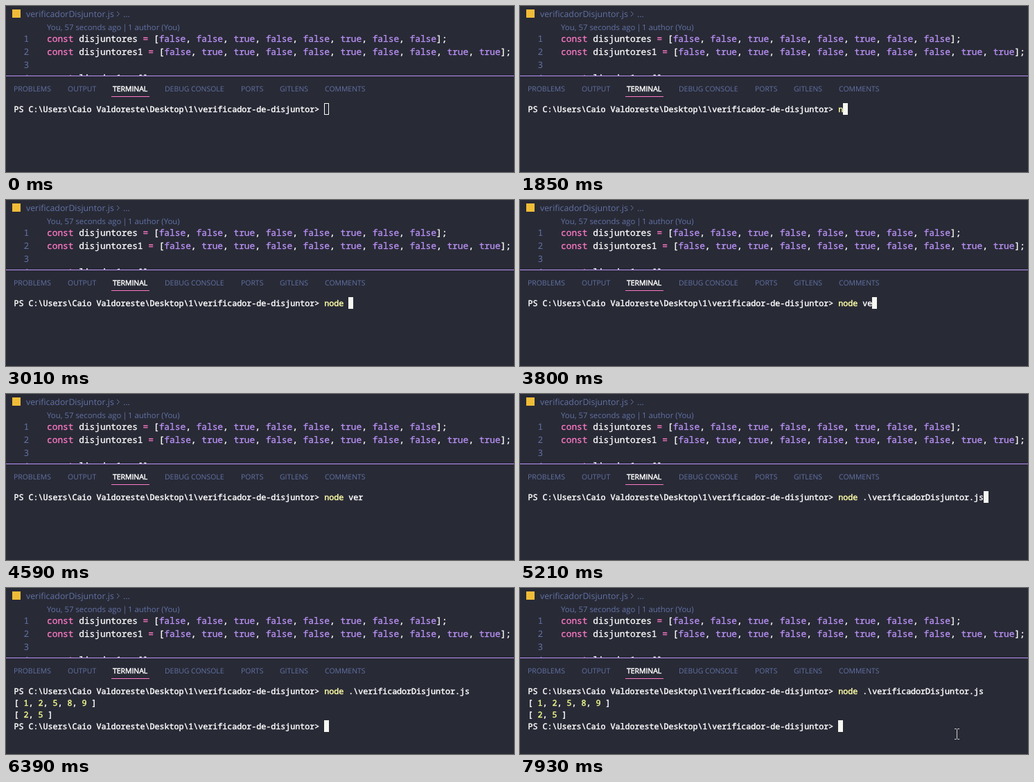
An HTML page that plays this animation: 733x241 px, repeating every 8 s.

```html
<!DOCTYPE html>
<html lang="pt">
<head>
<meta charset="utf-8">
<style>
  html, body { margin: 0; width: 100%; height: 100%; overflow: hidden; background: #282a36; }
  svg { display: block; }
  text { white-space: pre; text-rendering: geometricPrecision; }
  text, tspan { fill: currentColor; stroke: currentColor; stroke-width: 0; }
  .ui { font-family: "Open Sans", "Noto Sans", sans-serif; }
  .code, .term { font-family: "Noto Sans Mono", "DejaVu Sans Mono", monospace; color: #fff; }
  .code { font-size: 12.83px; }
  .term { font-size: 11.667px; font-weight: 500; }
  .code :is(text, tspan) { stroke-width: 0.3px; }
  .term :is(text, tspan), .tabs .active { stroke-width: 0.45px; }
  .crumb { font-size: 12.35px; }
  .lens { font-size: 11.4px; }
  .tabs { font-size: 10.45px; }
  .dim { color: #6272a4; }
  .code .dim { stroke-width: 0; }
  .active { color: #fff; }
  .key { color: #ff79c6; }
  .bool { color: #bd93f9; }
  .cmd { color: #ffffa5; }
  .num { color: #f1fa8c; }
</style>
</head>
<body>
<svg width="733" height="241" viewBox="0 0 733 241">
  <rect width="733" height="241" fill="#282a36"/>
  <rect x="9" y="5" width="12" height="12" fill="#f0bc38"/>
  <g class="ui crumb dim">
    <text x="29" y="16">verificadorDisjuntor.js</text>
    <path d="M160 8l3.5 3.5-3.5 3.5" fill="none" stroke="#6272a4"/>
    <text x="169" y="16">...</text>
  </g>
  <g class="ui lens dim">
    <text x="59" y="35">You, 57 seconds ago</text>
    <text x="168.5" y="35">|</text>
    <text x="176" y="35">1 author (You)</text>
  </g>
  <g id="code" class="code"></g>
  <rect y="101" width="733" height="140" fill="#282a36"/>
  <rect y="101" width="733" height="1" fill="#bd93f9"/>
  <g id="tabs" class="ui tabs dim"></g>
  <rect x="152" y="131" width="55" height="1" fill="#ff79c6"/>
  <g id="term" class="term"></g>
  <rect id="caret" stroke="#f8f8f2"/>
  <path id="mouse" d="M-3.5-7.5h2.5l1 1 1-1h2.5M0-6.5v13M-3.5 7.5h2.5l1-1 1 1h2.5" fill="none" stroke="#d0d0d0"/>
</svg>
<script>
const $ = id => document.getElementById(id);
const text = (x, y, content, cls = '') => `<text x="${x}" y="${y}" class="${cls}">${content}</text>`;
const span = (cls, content) => `<tspan class="${cls}">${content}</tspan>`;

const LOOP = 8000, LEFT = 11, TOP = 141, CELL = 7, ROW = 17;
const PROMPT = 'PS C:\\Users\\Caio Valdoreste\\Desktop\\1\\verificador-de-disjuntor> ';
const OUTPUT = ['[ 1, 2, 5, 8, 9 ]', '[ 2, 5 ]'];
const KEYS = [
  [0, ''], [1850, 'n'], [2340, 'no'], [2530, 'nod'], [2720, 'node'], [3010, 'node '],
  [3700, 'node v'], [3800, 'node ve'], [4070, 'node ver'], [4670, 'node veri'],
  [5130, 'node .\\verificadorDisjuntor.js']
];
const FOCUS = 930, ENTER = 6130, PRINT = 6320, DONE = 6390;
const BLINKS = [[3610, 3700], [4590, 4670]];
const MOVES = [7730, 7800, 7860, 7930];

const CODE = [
  'const disjuntores = [false, false, true, false, false, true, false, false];',
  'const disjuntores1 = [false, true, true, false, false, true, false, false, true, true];',
  '',
  'const ligados1 = [];'
];
$('code').innerHTML = CODE.map((line, i) => {
  const y = 52 + 19 * i;
  const colored = line.replace(/const|=|true|false/g, w => span(/e$/.test(w) ? 'bool' : 'key', w));
  return text(25.5, y, i + 1, 'dim') + text(59, y, colored);
}).join('');

const TABS = [[11, 'PROBLEMS'], [89, 'OUTPUT'], [154, 'TERMINAL'], [229, 'DEBUG CONSOLE'],
  [339, 'PORTS'], [395, 'GITLENS'], [460, 'COMMENTS']];
$('tabs').innerHTML = TABS.map(([x, name]) =>
  text(x, 124, name, name === 'TERMINAL' ? 'active' : '')).join('');

const prompt = PROMPT.replace('>', '&gt;');
let shown = '';

function drawTerminal(t, typed) {
  const lines = [prompt + typed.replace(/^\w+/, w => span('cmd', w))];
  if (t >= PRINT) lines.push(...OUTPUT.map(s => s.replace(/\d/g, d => span('num', d))));
  if (t >= DONE) lines.push(prompt);
  const html = lines.map((line, i) => text(LEFT + 0.6, TOP + 13 + ROW * i, line)).join('');
  if (html !== shown) $('term').innerHTML = shown = html;
}

function drawCaret(t, typed) {
  const row = t < ENTER ? 0 : t < PRINT ? 1 : 3;
  const col = t < ENTER ? PROMPT.length + typed.length : t < DONE ? 0 : PROMPT.length;
  const caret = $('caret');
  const box = { x: LEFT + CELL * col + 0.5, y: TOP + ROW * row + 0.5, width: CELL - 1, height: ROW - 1 };
  for (const k in box) caret.setAttribute(k, box[k]);
  caret.setAttribute('fill', t < FOCUS ? 'none' : '#f8f8f2');
  caret.style.display = BLINKS.some(([a, b]) => t >= a && t < b) ? 'none' : '';
}

// The pointer sweeps left first, then down.
function drawMouse(t) {
  const step = MOVES.filter(m => t >= m).length - 1;
  const p = Math.max(step, 0) / 3;
  const x = Math.round(630 + 66 * (1 - p) ** 4) + 0.5;
  const y = Math.round(147 + 65 * p ** 1.25);
  $('mouse').setAttribute('transform', `translate(${x} ${y})`);
  $('mouse').style.display = step < 0 ? 'none' : '';
}

const start = performance.now();
function frame() {
  const t = (performance.now() - start) % LOOP;
  const typed = KEYS.filter(([at]) => t >= at).pop()[1];
  drawTerminal(t, typed);
  drawCaret(t, typed);
  drawMouse(t);
  requestAnimationFrame(frame);
}
frame();
</script>
</body>
</html>
```
